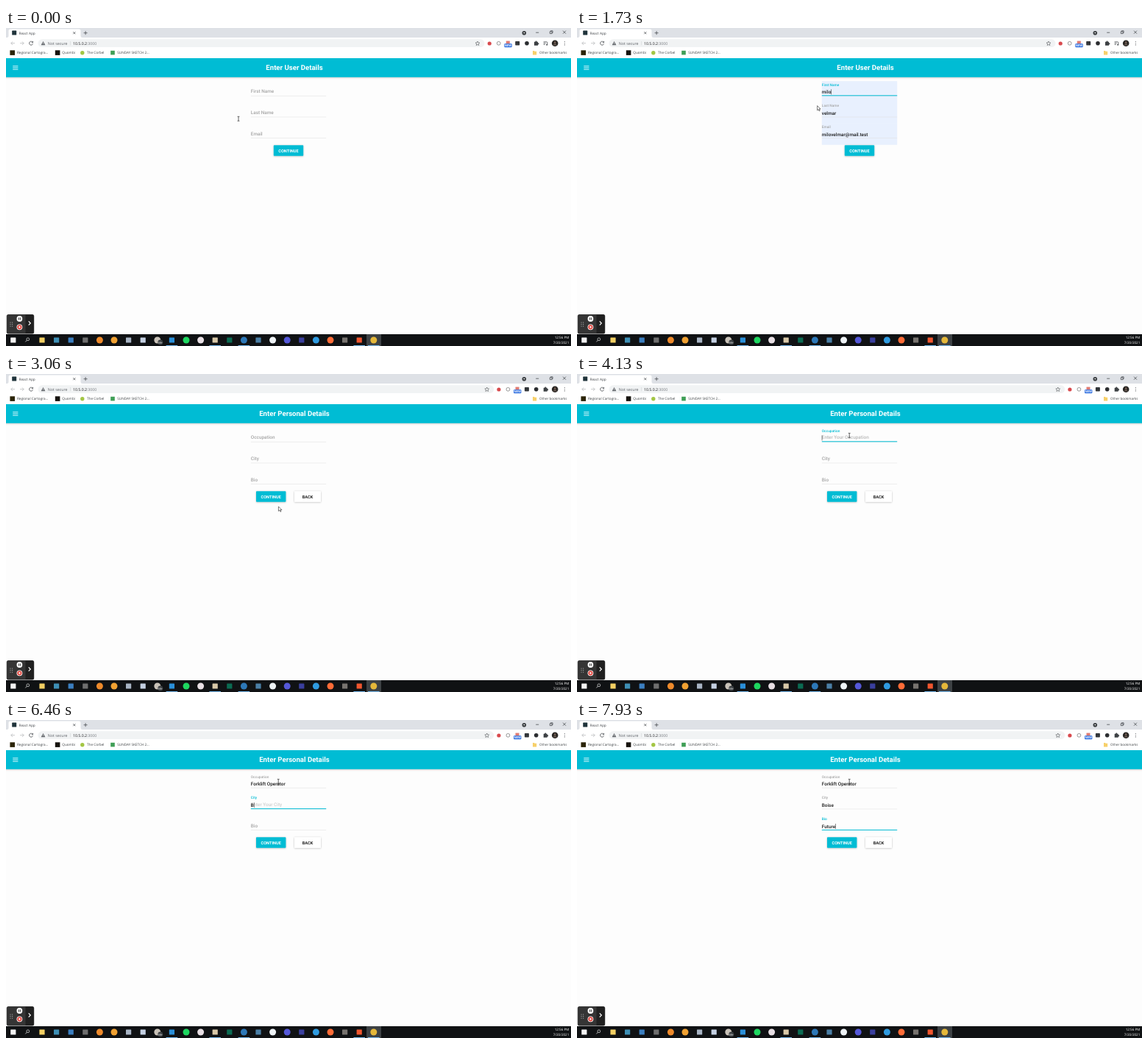
These frames come from a looping animation (768x432 px, 8 s). An HTML page:

```html
<!DOCTYPE html>
<html lang="en">
<head>
<meta charset="utf-8">
<title>User form</title>
<style>
html, body { margin: 0; width: 100%; height: 100%; overflow: hidden; background: #fdfdfd; }
svg { display: block; width: 768px; height: 432px; text-rendering: geometricPrecision; }
.ui { font-family: "Open Sans", "Noto Sans", sans-serif; }
.app { font-family: Roboto, sans-serif; font-weight: 500; }
.mid { text-anchor: middle; }
.end { text-anchor: end; }
.line { fill: none; stroke: #4a4d51; stroke-width: .8; }
</style>
</head>
<body>
<svg id="stage" viewBox="0 0 768 432"></svg>
<script>
const LOOP = 8000;
const SWITCH = 2700;
const CYAN = '#00bcd4';
const LEFT = 332.8, WIDTH = 102.4, ROW = 28.8;

const rect = (x, y, w, h, fill, more = '') =>
  `<rect x="${x}" y="${y}" width="${w}" height="${h}" fill="${fill}" ${more}/>`;
const dot = (x, y, r, fill, more = '') =>
  `<circle cx="${x}" cy="${y}" r="${r}" fill="${fill}" ${more}/>`;
const line = (d, more = '') => `<path class="line" d="${d}" ${more}/>`;
const text = (x, y, size, str, fill, cls = 'ui', more = '') =>
  `<text x="${x}" y="${y}" font-size="${size}" fill="${fill}" class="${cls}" ${more}>${str}</text>`;
const group = (id, body) => `<g id="${id}">${body}</g>`;

function extensions() {
  const puzzle = 'M718 18.8h1.6a1 1 0 1 1 1.9 0h1.5v1.6a1 1 0 1 1 0 1.8v1.6h-5z';
  return dot(657.2, 21, 2.6, '#d8494d') +
    dot(669.7, 20.8, 2.4, 'none', 'stroke="#8b8b8b" stroke-width=".9"') +
    rect(679.8, 17.6, 5, 4, '#e07b72') +
    rect(677.3, 21.3, 10.4, 5, '#2f6fe0', 'rx="1"') +
    text(682.5, 25.3, 4, 'NEW', '#fff', 'ui mid', 'font-weight="700"') +
    rect(692.2, 18, 6, 5.6, '#33363a', 'rx=".8"') +
    dot(708, 20.8, 2.8, '#2b2d30') +
    `<path d="${puzzle}" fill="#3c4043"/>`;
}

function browser() {
  let s = rect(0, 0, 768, 13, '#dee1e6') + rect(0, 13, 768, 28, '#fff') +
    '<path d="M1 13q2.5 0 2.5-2.5V4q0-2.5 2.5-2.5h93q2.5 0 2.5 2.5v6.500q0 2.500 2.500 2.500z" fill="#fff"/>' +
    rect(8.2, 3.6, 6, 6, '#20343b', 'rx=".6"') +
    text(17.5, 8.7, 4.75, 'React App', '#45484c') +
    line('M91.300 5.200l3 3m0-3l-3 3') + line('M105.600 6.700h5m-2.500-2.500v5');
  // window controls
  s += dot(704.3, 6.7, 2.8, '#3c4043') +
    '<path d="M703 6.100h2.600l-1.300 1.500z" fill="#fff"/>' +
    line('M720.200 6.200h4') + line('M739.300 4.800h2.800v2.800h-2.800zM740.300 4.800v-1h2.800v2.800h-1') +
    line('M757 3.700l4 4m0-4l-4 4');
  // toolbar
  s += line('M12 20.700h-5.200m2.300-2.300l-2.300 2.300l2.300 2.300', 'style="stroke:#babcbe"') +
    line('M19 20.700h5.200m-2.300-2.300l2.300 2.300l-2.300 2.300', 'style="stroke:#babcbe"') +
    line('M36.200 19.300a2.500 2.500 0 1 0 .3 2.200M36.600 17.900v1.900h-1.900') +
    rect(43.5, 15.3, 607, 10.8, '#f1f3f4', 'rx="5.400" id="pill"') +
    '<path d="M50.500 18l2.800 5.200h-5.600z" fill="#5f6368"/>' + rect(50.2, 19.6, .6, 2.6, '#f1f3f4') +
    text(56.8, 22.7, 5.3, 'Not secure', '#5f6368') + rect(87, 18, .4, 5.4, '#c4c7ca') +
    text(91, 22.7, 5.2, '10.5.0.2<tspan fill="#777b80">:3000</tspan>', '#202124');
  s += group('star', line('M641 18l.9 1.900 2 .2-1.500 1.400.4 2-1.800-1-1.800 1 .4-2-1.500-1.400 2-.2z', 'style="stroke-width:.6"')) +
    group('ext', extensions()) +
    group('media', line('M730.600 18.800h4.500m-4.500 1.800h3m-3 1.800h2.200m3-3.600v3.800') + dot(735.2, 22.7, 1, '#4a4d51')) +
    dot(746.2, 20.8, 4.3, '#282522') + dot(746.2, 19.6, 1.3, '#796257') +
    '<path d="M743.800 23.600a2.400 2.400 0 0 1 4.800 0z" fill="#665850"/>' +
    [18.5, 20.7, 22.9].map(y => dot(759.3, y, .55, '#4a4d51')).join('');
  // bookmarks
  s += rect(5.4, 30.3, 6.6, 6.6, '#2b2408') + text(15, 35.4, 4.65, 'Regional Cartogra...', '#3c4043') +
    rect(66.8, 30.3, 6.6, 6.6, '#16130e') + text(76.3, 35.4, 4.65, 'Quombi', '#3c4043') +
    dot(103.8, 33.7, 2.7, '#a3c644') + text(110, 35.4, 4.65, 'The Corbel', '#3c4043') +
    rect(142.2, 30.8, 5.6, 5.6, '#3f9f56') + text(151.3, 35.4, 4.65, 'SUNDAY SKETCH 2...', '#3c4043') +
    '<path d="M716 31h2l.7.8h2.500v4.700H716z" fill="#f7d06a"/>' +
    text(725, 35.4, 4.55, 'Other bookmarks', '#3c4043');
  return s;
}

function recorder() {
  let s = rect(.8, 389, 37.4, 26.4, '#353535', 'rx="2.500"') +
    '<path d="M26.500 389.500h9q2.200 0 2.200 2.200v21q0 2.200-2.200 2.200h-9z" fill="#202020"/>';
  for (let i = 0; i < 6; i++) s += dot(6 + (i % 2) * 2.6, 400 + (i >> 1) * 2.5, .6, '#c8c8c8');
  return s + dot(18.4, 395, 3.9, '#fff') + rect(16.9, 393.4, 1, 3.2, '#333') + rect(18.9, 393.4, 1, 3.2, '#333') +
    dot(18.4, 406.3, 3.9, '#fff') + dot(18.4, 406.3, 3.1, '#e2453d') + rect(17.3, 405.2, 2.2, 2.2, '#fff') +
    line('M30.700 398.300l2.600 2.700-2.600 2.700', 'style="stroke:#fff;stroke-width:1.200"');
}

function taskbar() {
  // s = square, c = circle
  const icons = ('s#f4f4f4 - s#f2cf63 s#3e8fb5 s#3b7fc0 s#6f6f6f c#ee8a2b c#f0a132 s#a8b4c4 s#c4d0e2 c#c9c2b8 ' +
    's#2a8fd8 c#1ed760 c#e8dfe4 s#d8c8a8 s#0b6b52 c#2d78b8 s#4b7fa6 c#eef3f6 c#5558d8 s#3a3f9e ' +
    'c#2f9be0 c#ff6c37 s#77736f s#f0562e c#e5b83a').split(' ');
  let s = rect(0, 416, 768, 16, '#101214') + rect(490, 416, 20, 16, '#3d4144');
  icons.forEach((icon, i) => {
    const x = 9.8 + i * 19.6, color = icon.slice(1);
    if (icon === '-') s += dot(x + .4, 422.8, 1.9, 'none', 'stroke="#e8e8e8" stroke-width=".7"') +
      line(`M${x - 1} 424.200l-2 2.200`, 'style="stroke:#e8e8e8"');
    else if (icon[0] === 's') s += rect(x - 3.6, 420.4, 7.2, 7.2, color, 'rx=".5"');
    else s += dot(x, 424, 4.5, color);
  });
  s += dot(209.8, 427, 3.5, '#3b3f42') + text(209.8, 428.6, 3.8, '99+', '#fff', 'ui mid');
  for (const i of [11, 14, 16, 24, 25]) s += rect(2 + i * 19.6, 431, 15.6, 1, '#76b9ed');
  return s + text(765.3, 422, 4.55, '12:56 PM', '#fff', 'ui end') + text(765.3, 429.3, 4.55, '7/20/2021', '#fff', 'ui end');
}

function field(i) {
  const y = i * ROW;
  return rect(LEFT, 72.2 + y, WIDTH, ROW + .1, '#e8f0fe', `id="auto${i}"`) +
    rect(LEFT, 91.9 + y, WIDTH, .5, '#dcdcdc') +
    rect(LEFT, 91.3 + y, WIDTH, 1, CYAN, `id="bar${i}"`) +
    text(LEFT, 88.2 + y, 6.4, '', '#b9b9b9', 'app', `id="hint${i}"`) +
    text(0, 0, 6.4, '', '#a5a5a5', 'app', `id="label${i}"`) +
    text(LEFT, 89.2 + y, 6.4, '', '#1c1c1c', 'app', `id="value${i}"`);
}

const button = (id, x, w, label, fill, ink) => group(id,
  rect(x, 159.3, w, 14.4, fill, 'rx=".8" filter="url(#drop)"') +
  text(x + w / 2, 168.5, 5.6, label, ink, 'app mid', 'style="font-weight:700"'));

const stage = document.getElementById('stage');
stage.innerHTML =
  `<defs><filter id="drop" x="-20%" y="-40%" width="140%" height="200%">
    <feDropShadow dx="0" dy=".5" stdDeviation=".9" flood-opacity=".28"/></filter></defs>` +
  rect(0, 0, 768, 432, '#fdfdfd') + rect(-10, 41, 788, 25.8, CYAN, 'filter="url(#drop)"') + browser() +
  [51.8, 54, 56.2].map(y => rect(9.2, y - .4, 7.2, .8, '#fff')).join('') +
  text(392, 57.3, 9.6, '', '#fff', 'app mid', 'id="title" style="font-weight:700"') +
  [0, 1, 2].map(field).join('') + rect(0, 0, .5, 7, '#111', 'id="caret"') +
  button('next', 340, 40.4, 'CONTINUE', CYAN, '#fff') +
  button('back', 392, 36, 'BACK', '#fff', '#222') +
  recorder() + taskbar() +
  '<path id="arrow" d="M0 0v6.300l1.500-1.400 1.100 2.300 1-.5-1.100-2.200h2z" fill="#fff" stroke="#222" stroke-width=".6"/>' +
  '<path id="beam" d="M-1.400-3h1q.4 0 .4.400q0-.4.400-.4h1M0-2.700v5.400M-1.400 3h1q.4 0 .4-.4q0 .4.400.4h1" fill="none" stroke="#222" stroke-width=".7"/>';

const el = {};
stage.querySelectorAll('[id]').forEach(n => el[n.id] = n);
const set = (id, attrs) => { for (const k in attrs) el[id].setAttribute(k, attrs[k]); };
const show = (id, on) => { el[id].style.display = on ? '' : 'none'; };
const write = (id, str) => { if (el[id].textContent !== str) el[id].textContent = str; };

// focus: gains focus, blur: loses it, type: first letter, step: ms per letter (0 = filled at once)
const pages = [
  { title: 'Enter User Details', fields: [
    { name: 'First Name', value: 'milo', focus: 700, blur: 1e5, type: 1450, step: 0 },
    { name: 'Last Name', value: 'velmar', focus: 1e5, blur: 1e5, type: 1450, step: 0 },
    { name: 'Email', value: 'milovelmar@mail.test', focus: 1e5, blur: 1e5, type: 1450, step: 0 }] },
  { title: 'Enter Personal Details', fields: [
    { name: 'Occupation', value: 'Forklift Operator', focus: 3750, blur: 6060, type: 4420, step: 86 },
    { name: 'City', value: 'Boise', focus: 6060, blur: 7100, type: 6430, step: 110 },
    { name: 'Bio', value: 'Future', focus: 7100, blur: 1e5, type: 7480, step: 85 }] }
];

// time, x, y, pointer shape from here on
const path = [
  [0, 316, 123.3, 'beam'], [250, 316, 123.3, 'beam'], [650, 345, 87, 'beam'],
  [1150, 345, 87, 'beam'], [1400, 340, 100, 'arrow'], [1680, 326.6, 105.6, 'arrow'],
  [1950, 326.6, 105.6, 'arrow'], [2500, 376, 167, 'arrow'], [2750, 376, 167, 'arrow'],
  [2980, 370.4, 180, 'arrow'], [3200, 370.4, 180, 'arrow'], [3500, 370.4, 110, 'beam'],
  [3650, 370.2, 83.4, 'beam'], [LOOP, 370.2, 83.4, 'beam']
];

// quint ease-out over 450 ms
const ease = ms => 1 - Math.pow(1 - Math.min(1, Math.max(0, ms / 450)), 5);

function drawField(f, i, t, first) {
  const y = i * ROW;
  const focused = t >= f.focus && t < f.blur;
  const count = t < f.type ? 0 : f.step ? Math.min(f.value.length, 1 + Math.floor((t - f.type) / f.step)) : f.value.length;
  const lift = ease(t - Math.min(f.focus, f.type));
  const bar = ease(t - f.focus) - ease(t - f.blur);
  write('label' + i, f.name);
  write('hint' + i, 'Enter Your ' + f.name);
  write('value' + i, f.value.slice(0, count));
  set('label' + i, {
    transform: `translate(${LEFT} ${88.3 + y - 9.8 * lift}) scale(${1 - .25 * lift})`,
    fill: focused ? CYAN : '#a5a5a5'
  });
  set('hint' + i, { opacity: Math.max(0, ease(t - f.focus) - ease(t - f.type)) });
  set('bar' + i, { x: LEFT + WIDTH * (1 - bar) / 2, width: WIDTH * bar });
  show('auto' + i, first && count > 0);
  if (!focused) return;
  const last = count ? f.type + (count - 1) * f.step : f.focus;
  show('caret', (t - last) % 1060 < 530);
  set('caret', { x: LEFT + (count ? el['value' + i].getComputedTextLength() + .1 : 0), y: 83.3 + y });
}

function drawPointer(t) {
  let i = 0;
  while (i < path.length - 2 && t >= path[i + 1][0]) i++;
  const [t0, x0, y0, kind] = path[i], [t1, x1, y1] = path[i + 1];
  const p = (t - t0) / (t1 - t0), k = p * p * (3 - 2 * p);
  show('arrow', kind === 'arrow');
  show('beam', kind === 'beam');
  set(kind, { transform: `translate(${x0 + (x1 - x0) * k} ${y0 + (y1 - y0) * k})` });
}

function draw(t) {
  const first = t < SWITCH, page = pages[first ? 0 : 1];
  write('title', page.title);
  show('caret', false);
  page.fields.forEach((f, i) => drawField(f, i, t, first));
  show('back', !first);
  show('media', first);
  set('next', { transform: `translate(${first ? 23.8 : 0} 0)` });
  set('pill', { width: first ? 607 : 619.7 });
  const shift = `translate(${first ? 0 : 12.7} 0)`;
  set('star', { transform: shift });
  set('ext', { transform: shift });
  drawPointer(t);
}

const start = performance.now();
function tick() {
  draw((performance.now() - start) % LOOP);
  requestAnimationFrame(tick);
}
tick();
</script>
</body>
</html>
```
